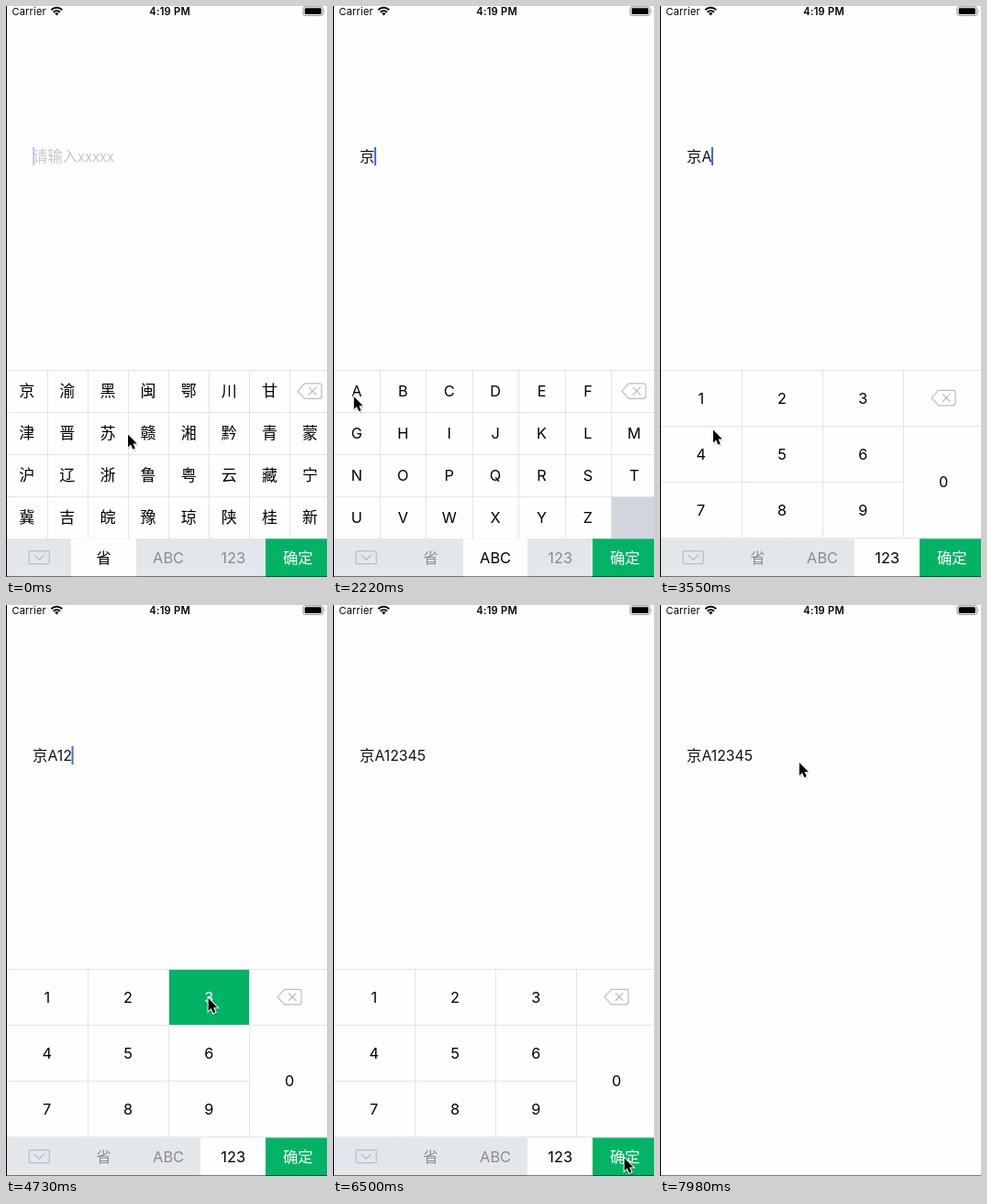
Animation of 350x623 px, one loop 8000 ms. Source, as an HTML page:

```html
<!DOCTYPE html>
<html lang="zh-CN">
<head>
<meta charset="utf-8">
<title>Plate keyboard</title>
<style>
html, body { margin: 0; width: 100%; height: 100%; overflow: hidden; background: #fefefe; }
svg { display: block; width: 350px; height: 623px; }
text { font-family: Inter, "Noto Sans CJK SC", "Noto Sans CJK", sans-serif; white-space: pre; }
.mid { text-anchor: middle; }
.key rect { fill: #fefefe; shape-rendering: crispEdges; }
.key.down rect { fill: #02b365; }
.key.down text { fill: #fff; }
.line { stroke: #e4e4e4; stroke-width: 1; }
.icon { fill: none; stroke: #b7bdc8; stroke-width: 1.2; stroke-linejoin: round; stroke-linecap: round; }
.tab rect { fill: #e3e7ec; }
.tab text { fill: #8b8b8b; }
.tab.on rect { fill: #fefefe; }
.tab.on text { fill: #000; }
.ok rect { fill: #02b365; }
.ok text { fill: #fff; }
</style>
</head>
<body>
<svg viewBox="0 0 350 623">
  <rect width="350" height="623" fill="#fefefe"/>
  <text x="6.5" y="9.6" font-size="11" letter-spacing=".2">Carrier</text>
  <g fill="none" stroke="#000" stroke-width="2">
    <path d="M49.4 4.2a8.6 8.6 0 0 1 11.8 0"/>
    <path d="M51.7 6.7a5.2 5.2 0 0 1 7.2 0"/>
  </g>
  <path d="M53.2 8.1a3 3 0 0 1 4.2 0L55.3 10.4Z"/>
  <text class="mid" x="178.6" y="9.6" font-size="11.2" font-weight="600" letter-spacing=".2">4:19 PM</text>
  <rect x="324" y=".8" width="21.6" height="9.6" rx="2.4" fill="none" stroke="#8a8a8a"/>
  <rect x="325.7" y="2.3" width="18.2" height="6.6" rx="1.2"/>
  <path d="M346.8 3.8q1.6 1.8 0 3.6Z" fill="#8a8a8a"/>
  <text id="hint" x="29" y="169.6" font-size="15" fill="#c7c7cc" letter-spacing="-.2"><tspan font-size="16.5">请输入</tspan>xxxxx</text>
  <text id="field" x="29" y="169.6" font-size="15.8" fill="#111"><tspan id="head" font-size="16.4"></tspan><tspan id="tail"></tspan></text>
  <rect id="caret" y="154" width="2" height="20" fill="#4669dc"/>
  <g id="board"></g>
  <path d="M.5 0V623" stroke="#000"/>
  <path d="M1 622.5H350" stroke="#000" opacity=".5"/>
  <g id="pointer">
    <path d="M1 2V17L4.4 13.7 6.8 19 9.4 17.9 7.2 12.8H11.6Z" opacity=".16"/>
    <path d="M0 .5V14.4L3.1 11.5 5.4 16.7 7.8 15.6 5.5 10.6H9.8Z" stroke="#fff" stroke-width="2" paint-order="stroke"/>
  </g>
</svg>
<script>
const $ = id => document.getElementById(id);
const LOOP = 8000, STEP = 147.6;
const TOP = 397.5, LEFT = 1, WIDE = 353, HEIGHT = 225, BAR = 581.3;
const board = $('board'), panels = {}, tabs = {}, keys = {}, spots = {};

function add(parent, tag, attrs, text) {
  const el = document.createElementNS('http://www.w3.org/2000/svg', tag);
  for (const name in attrs) el.setAttribute(name, attrs[name]);
  if (text) el.textContent = text;
  return parent.appendChild(el);
}

function label(parent, name, x, y, size) {
  add(parent, 'text', { class: 'mid', x: x - .4, y: y + size * .37, 'font-size': size }, name);
  spots[name] = [x - 1, y + 1];
}

const line = (parent, x1, y1, x2, y2) => add(parent, 'line', { class: 'line', x1, y1, x2, y2 });

function addKey(panel, name, x, y, w, h, size) {
  const g = add(panel, 'g', { class: 'key' });
  const cell = add(g, 'rect', { x, y, width: w, height: h });
  const cx = x + w / 2, cy = y + h / 2 - .4;
  if (name === '<') {
    add(g, 'path', { class: 'icon', transform: `translate(${cx - .8} ${cy})`,
      d: 'M-13 0L-5.5-8.3H10.5Q13-8.3 13-6V6Q13 8.3 10.5 8.3H-5.5ZM-.8-3.9L7 3.9M7-3.9L-.8 3.9' });
  } else if (name === '_') {
    cell.style.fill = '#d1d5dd';
  } else {
    label(g, name, cx, cy, size);
    keys[name] = g;
  }
}

function grid(id, rows, cols, h, size) {
  const panel = panels[id] = add(board, 'g', {});
  const w = WIDE / cols, bottom = TOP + rows.length * h;
  rows.forEach((row, r) => [...row].forEach((name, c) =>
    addKey(panel, name, LEFT + c * w, TOP + r * h, w, h, size)));
  for (let r = 0; r <= rows.length; r++) line(panel, LEFT, TOP + r * h, 350, TOP + r * h);
  for (let c = 1; c < cols; c++) {
    const x = Math.floor(LEFT + c * w) + .5;
    line(panel, x, TOP, x, bottom);
  }
  return panel;
}

grid('省', ['京渝黑闽鄂川甘<', '津晋苏赣湘黔青蒙', '沪辽浙鲁粤云藏宁', '冀吉皖豫琼陕桂新'], 8, 46, 17);
grid('ABC', ['ABCDEF<', 'GHIJKLM', 'NOPQRST', 'UVWXYZ_'], 7, 46, 16.3);
const pad = grid('123', ['123<', '456', '789'], 4, 61, 16.3);
addKey(pad, '0', 266, TOP + 61.5, 87, 121, 16.3);

['', '省', 'ABC', '123', '确定'].forEach((name, i) => {
  const w = WIDE / 5, x = LEFT + i * w;
  const g = tabs[name] = add(board, 'g', { class: name === '确定' ? 'ok' : 'tab' });
  add(g, 'rect', { x: Math.floor(x), y: BAR, width: w + 1, height: 42 });
  if (name) label(g, name, x + w / 2, 602, 16.4);
  else add(g, 'path', { class: 'icon',
    d: 'M26.7 594.6H45.7Q47.2 594.6 47.2 596V607.2Q47.2 608.6 45.7 608.6H26.7Q25.2 608.6 25.2 607.2V596Q25.2 594.6 26.7 594.6ZM31 599.3L36.2 604.2 41.4 599.3' });
});

const PLATE = '京A12345';
const stops = [
  [2, [133, 467]], [5, [198, 453]], [8, [116, 437]], [14, '京'], [18, [27, 450]], [21, 'A'],
  [24, [58, 462]], [26, '1'], [30, '2'], [32, '3'], [37, '4'], [39, '5'], [44, '确定'], [54, [152, 171.5]]
].map(([at, to]) => ({ at, key: to, spot: spots[to] || to }));
const taps = stops.filter(s => keys[s.key]);
const done = stops.find(s => s.key === '确定').at;

const clamp = k => Math.max(0, Math.min(1, k));
const ease = k => k * k * (3 - 2 * k);

function pointerAt(n) {
  const i = Math.max(1, stops.findIndex(s => s.at >= n));
  const a = stops[i - 1], b = stops[i];
  const k = ease(clamp((n - a.at) / (b.at - a.at)));
  return a.spot.map((v, j) => v + (b.spot[j] - v) * k);
}

function draw(n) {
  const typed = taps.filter(s => s.at < n), count = typed.length;
  $('hint').style.display = count ? 'none' : '';
  $('head').textContent = PLATE.slice(0, Math.min(count, 1));
  $('tail').textContent = PLATE.slice(1, Math.max(count, 1));

  // The blink restarts with each character
  const beat = (n - (count ? typed[count - 1].at + 1 : -4)) % 7;
  $('caret').setAttribute('x', 29 + (count && $('field').getComputedTextLength() - .3));
  $('caret').setAttribute('opacity', n < done ? clamp((4.35 - beat)) : 0);

  const mode = ['省', 'ABC', '123'][Math.min(count, 2)];
  for (const id in panels) {
    panels[id].style.display = id === mode ? '' : 'none';
    tabs[id].classList.toggle('on', id === mode);
  }
  taps.forEach(s => keys[s.key].classList.toggle('down', s.at === n));

  const drop = HEIGHT * ease(clamp((n - done - 1) / 3));
  board.style.display = drop < HEIGHT ? '' : 'none';
  board.setAttribute('transform', `translate(0 ${drop})`);
  $('pointer').setAttribute('transform', `translate(${pointerAt(Math.min(n, 54))})`);
}

let last = -1;
function tick() {
  const n = Math.floor(performance.now() % LOOP / STEP);
  if (n !== last) draw(last = n);
  requestAnimationFrame(tick);
}
tick();
</script>
</body>
</html>
```
